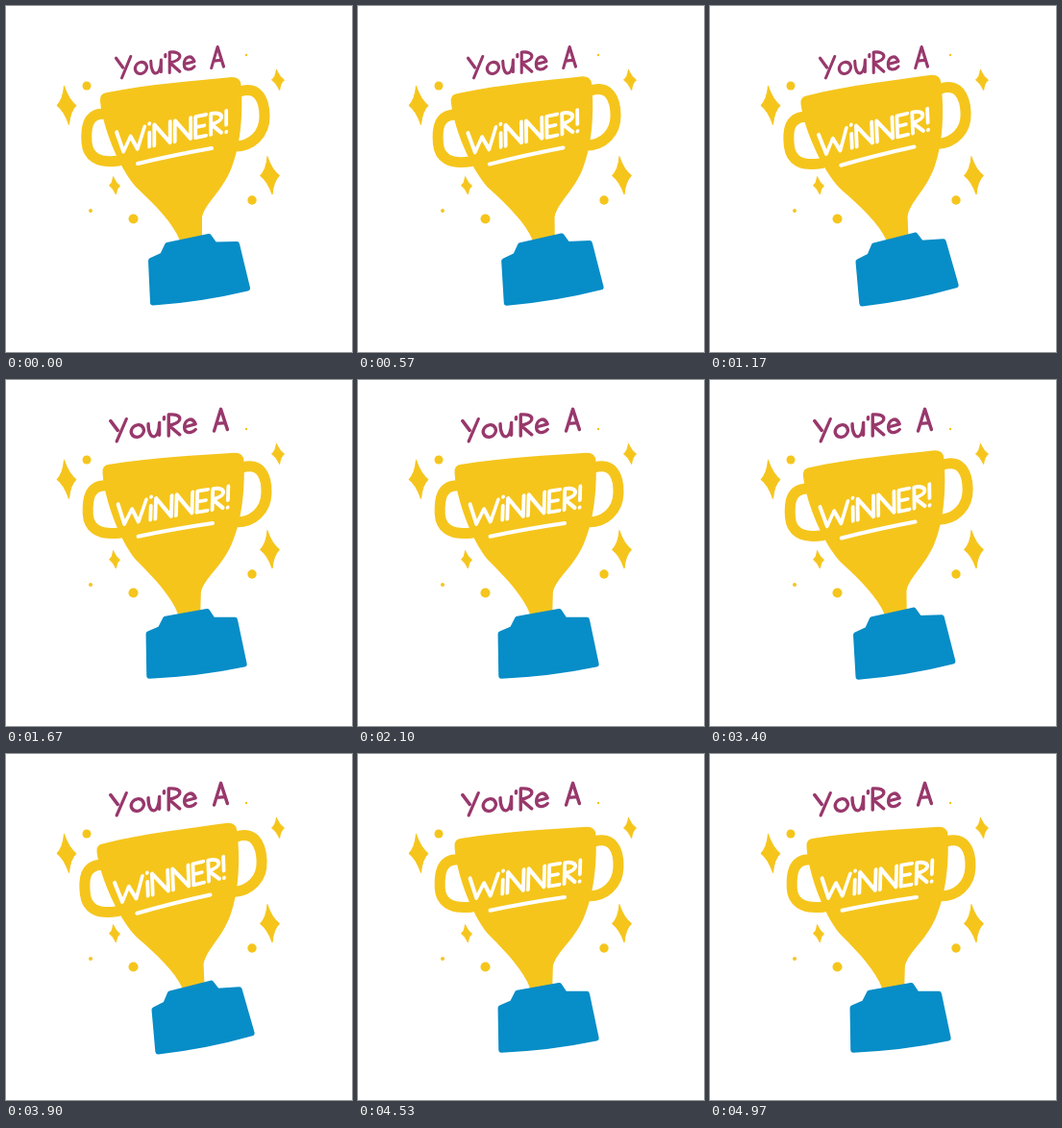
These frames come from a looping animation (360x360 px, 5 s). An HTML page:

```html
<!DOCTYPE html>
<html lang="en">
<head>
<meta charset="utf-8">
<title>You're a winner!</title>
<style>
  html, body { margin: 0; width: 100%; height: 100%; overflow: hidden; background: #fff; }
  svg { display: block; width: 100%; height: 100%; --gold: #f5c51c; }
  path { stroke-linecap: round; stroke-linejoin: round; }
  .line { fill: none; }
</style>
</head>
<body>
<svg viewBox="0 0 360 360" role="img" aria-label="You're a winner!">
  <g id="headline" class="line" stroke="#98386c"></g>
  <g id="sparkles" fill="var(--gold)" stroke="var(--gold)"></g>
  <g id="trophy">
    <g class="line" stroke="var(--gold)" stroke-width="11">
      <path d="M102 112C84 112 83 128 84 142S95 164 117 161"/>
      <path d="M243 89C262 83 269 97 269 115S256 146 238 146"/>
    </g>
    <path fill="var(--gold)" d="M98 99Q97 91 105 90C150 81 195 78 235 74Q244 74 244.500 82
      C247 112 244 146 234 170S207 205 204 220V240L181 244C174 226 155 207 138 191S101 130 98 99Z"/>
    <path fill="#078dc7" stroke="#078dc7" stroke-width="6"
      d="M168 249L211 240 217 248.500 240 248 251 293.500Q203 305 153 308.500L151 265 163 259.500Z"/>
    <g id="award" class="line" stroke="#fff"></g>
  </g>
</svg>
<script>
  const byId = id => document.getElementById(id);

  // Pen strokes per letter, six units tall: [width, path]
  const LETTERS = {
    Y: [4.3, 'M0 0L2 3M4.3 0L1.7 6'],
    o: [3.4, 'M1.7 2a1.7 1.7 0 1 0 .1 0'],
    u: [3, 'M0 2C0 7 3 7 3 2V5.500'],
    "'": [0, 'M0 .6v.6'],
    R: [3, 'M0 6V0C4 0 4 3 0 3L3 6'],
    e: [3, 'M0 4L3 3.500C2 1 0 2 0 4S2 6 3 5'],
    A: [3.6, 'M0 6L1.8 0 3.6 6M.7 4H3'],
    W: [8, 'M0 0L2 6 4 2 6 6 8 0'],
    i: [0, 'M0 2V6M0 -.6v.1'],
    N: [4.5, 'M0 6V0L4.500 6V0'],
    E: [3, 'M3 0H0V6H3M0 3H2.500'],
    '!': [0, 'M0 0V4M0 6v.1'],
    ' ': [2.5, '']
  };

  // Writes a phrase on a slanted baseline starting at (x, y).
  function write(id, phrase, { x, y, unit, gap, slant, pen }) {
    let cursor = 0;
    const strokes = [...phrase].map(char => {
      const [width, d] = LETTERS[char];
      const path = `<path transform="translate(${cursor} -6)" d="${d}"/>`;
      cursor += width + gap;
      return path;
    });
    byId(id).innerHTML = `<g transform="translate(${x} ${y}) skewY(${slant}) scale(${unit})"
      stroke-width="${pen / unit}">${strokes.join('')}</g>`;
  }

  // A leaning four-pointed star with hollow sides.
  function star(x, y, rx, ry) {
    const tips = [[-rx / 4, -ry], [rx, 0], [rx / 4, ry], [-rx, 0]];
    const sides = tips.map(([px, py], i) => {
      const [qx, qy] = tips[(i + 1) % 4];
      return `Q${x + (px + qx) * 0.3} ${y + (py + qy) * 0.3} ${x + qx} ${y + qy}`;
    });
    return `<path d="M${x - rx / 4} ${y - ry}${sides.join('')}Z"/>`;
  }

  const dot = (x, y, r) => `<circle cx="${x}" cy="${y}" r="${r}" stroke="none"/>`;

  write('headline', "You'Re A", { x: 114.5, y: 75.5, unit: 3.55, gap: 1.25, slant: -6.3, pen: 3.1 });
  write('award', 'WiNNER!', { x: 115, y: 153, unit: 3.65, gap: 1.38, slant: -11, pen: 3.8 });
  byId('award').innerHTML += '<path stroke-width="4" d="M137 164Q174 155 214 148"/>';
  byId('sparkles').innerHTML =
    star(63, 103.5, 10, 20) + star(274.5, 176.5, 10, 19.5) + star(283, 77, 6.5, 10.5) + star(113, 187, 5.5, 9) +
    dot(84, 83, 4.5) + dot(132.5, 221.5, 5) + dot(256, 202, 4.7) + dot(88, 213, 2) + dot(250, 51, 1.2);

  const LOOP = 5000, SWAY = 2850, BOUNCE = 570, REST = 330;

  // Smooth 0-to-1 step between two times
  function ease(t, from, to) {
    const p = Math.min(1, Math.max(0, (t - from) / (to - from)));
    return p * p * (3 - 2 * p);
  }

  // Lean left, swing over to the right, settle upright.
  function tilt(t) {
    const left = -2.4, right = 1.7;
    return left * ease(t, REST, 950) + (right - left) * ease(t, 1270, 1650) - right * ease(t, 2150, 2500);
  }

  function draw(now) {
    const t = now % LOOP;
    const raised = t % BOUNCE >= REST;
    byId('trophy').setAttribute('transform', `rotate(${tilt(t % SWAY)} 178 182)`);
    byId('headline').setAttribute('transform', raised ? 'translate(-15.8 -14) scale(1.087 1.04)' : '');
  }

  const start = performance.now();
  function tick() {
    draw(performance.now() - start);
    requestAnimationFrame(tick);
  }
  tick();
</script>
</body>
</html>
```
